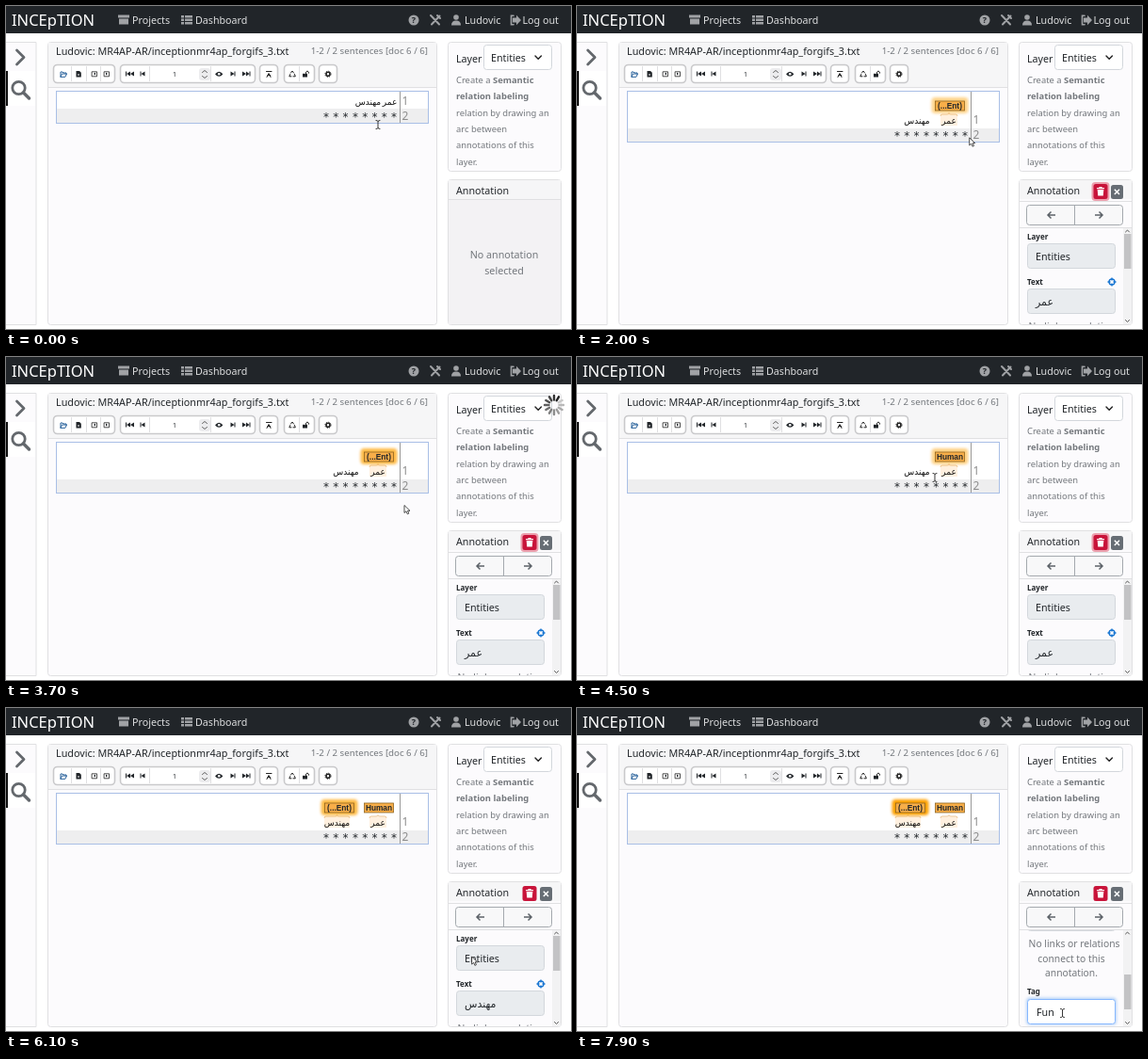
These frames come from a looping animation (600x343 px, 8 s). An HTML page:

```html
<!DOCTYPE html>
<html lang="en">
<head>
<meta charset="utf-8">
<title>Annotation editor</title>
<style>
html, body { margin: 0; width: 100%; height: 100%; overflow: hidden; background: #fff; }
svg { display: block; width: 600px; height: 343px; font: 10.7px "Noto Sans", "Open Sans", sans-serif; }
.panel { fill: #fcfbfd; stroke: #e0e0e2; }
.head { fill: #f6f6f7; }
.line { stroke: #e0e0e2; fill: none; }
.nav { fill: #dedfe0; }
.icon { fill: #a0a2a5; }
.muted { fill: #73777c; }
.small { font-size: 9.4px; }
.label { font-size: 8px; font-weight: 700; }
.group { fill: #fff; stroke: #c9c9cb; stroke-width: 1.6; }
.field { fill: #e9ecef; stroke: #d3d7dc; }
.ar { font-family: "DejaVu Sans", sans-serif; font-size: 9px; text-anchor: middle; }
.stars { font: 12px "DejaVu Sans", sans-serif; letter-spacing: 4.3px; }
.num { font-size: 12px; fill: #8c8c8c; }
.tag { font: 700 8.3px "Liberation Sans", Arial, sans-serif; text-anchor: middle; }
.mid { text-anchor: middle; }
.stroke { fill: none; stroke: #222; stroke-linecap: round; stroke-linejoin: round; }
</style>
</head>
<body>
<svg viewBox="0 0 600 343" fill="#212529">
<defs>
  <filter id="soft" x="-50%" y="-100%" width="200%" height="300%"><feGaussianBlur stdDeviation="1.7"/></filter>
  <clipPath id="view"><rect x="470" y="236" width="110" height="102"/></clipPath>
  <g id="back"><path d="M0 0l4-2.5v5zM-4 0l4-2.5v5z"/></g>
</defs>

<!-- navigation bar -->
<rect width="600" height="29"/>
<text x="6" y="21" font-size="16.5" fill="#fff">INCEpTION</text>
<g class="icon">
  <path d="M119 9.500h12v3h-12zM120 13.500h10v6h-10z"/>
  <path d="M186 10h3v2.500h-3zm4 0h8v2.500h-8zm-4 3.500h3v2.500h-3zm4 0h8v2.500h-8zm-4 3.500h3v2.500h-3zm4 0h8v2.500h-8z"/>
  <circle cx="433" cy="15" r="5.500"/>
  <circle cx="478" cy="12" r="2.800"/><path d="M473 20.500q0-5 5-5t5 5z"/>
  <path d="M538 12.500h4v-2.700l5 5.200-5 5.200v-2.700h-4z"/>
</g>
<text x="433" y="18.300" class="mid" font-size="9" font-weight="700">?</text>
<g fill="none" stroke="#a0a2a5" stroke-width="2" stroke-linecap="round">
  <path d="M452 11l8 8.500M460.500 10.500l-8.500 9M458 10l3 3M451 10l2.500 2.500"/>
  <path d="M539 10.300h-2.500v9.400h2.500" stroke-width="1.600"/>
</g>
<g class="nav">
  <text x="134" y="19">Projects</text><text x="201" y="19">Dashboard</text>
  <text x="487" y="19">Ludovic</text><text x="548.500" y="19">Log out</text>
</g>

<!-- sidebar -->
<path class="panel" d="M-1 38.500h33v300h-33z"/>
<path fill="#fff" d="M0 69h31v37h-31z"/>
<path fill="#111" d="M0 69h2v37h-2z"/>
<g fill="none" stroke="#64686d" stroke-width="2.800" stroke-linecap="round">
  <path d="M11.500 47l7.500 7.500-7.500 7.500" stroke-linejoin="round"/>
  <circle cx="13.500" cy="87" r="6.700"/><path d="M18.500 92l6 6" stroke-width="3.500"/>
</g>

<!-- document panel -->
<rect class="panel" x="44.500" y="38.500" width="413" height="300" rx="3"/>
<path class="head" d="M45 39h412v47h-412z"/><path class="line" d="M45 86.500h412"/>
<text x="53" y="52" font-size="10.800">Ludovic: MR4AP-AR/inceptionmr4ap_forgifs_3.txt</text>
<text x="448" y="51" class="muted" font-size="9.700" text-anchor="end">1-2 / 2 sentences [doc 6 / 6]</text>
<g class="group">
  <rect x="50.500" y="62.500" width="65" height="19" rx="4"/>
  <rect x="121.500" y="62.500" width="143" height="19" rx="4"/>
  <rect x="269.500" y="62.500" width="19" height="19" rx="4"/>
  <rect x="295.500" y="62.500" width="32" height="19" rx="4"/>
  <rect x="332.500" y="62.500" width="19" height="19" rx="4"/>
</g>
<path class="line" d="M69.500 64v16M85.500 64v16M100.500 64v16M152.500 64v16M217.500 64v16M311.500 64v16"/>
<path class="stroke" style="stroke:#27609a" d="M58 75v-5h2l1 1h3v1M58 75l1.500-3h5l-1.500 3z"/>
<path d="M74.500 69h3.500l1.800 1.800v4.700h-5.300z"/><path d="M76 73h2" stroke="#fff"/>
<path class="stroke" stroke-width=".8" d="M91.500 69.800h5v5h-5zM104.500 69.800h5v5h-5z"/>
<path d="M93 72l2-1.500v3zM108 72l-2-1.500v3z"/>
<use href="#back" x="132" y="72"/><path d="M127 69.500h1v5h-1zM142.500 69.500h1v5h-1zM143.500 72l4-2.500v5z"/>
<text x="179" y="74.500" class="mid" font-size="7">1</text>
<rect x="205" y="66" width="12" height="13" rx="3" fill="#ececee"/>
<path class="stroke" style="stroke:#555" stroke-width=".9" d="M208.500 70.500l2.500-2 2.500 2M208.500 74.500l2.500 2 2.500-2"/>
<path d="M222 72.200q4.200-5 8.400 0-4.200 5-8.400 0z"/><circle cx="226.200" cy="72.200" r="1.300" fill="#fff"/>
<path d="M238.500 69.500l4 2.500-4 2.500zM242.500 69.500h1v5h-1zM251 69.500l4 2.500-4 2.500zM255 69.500l3.500 2.500-3.500 2.500zM258.500 69.500h1v5h-1z"/>
<path class="stroke" d="M276.500 69.500h5.500M277 75.500l2-4 2 4M278 73.500h2.500"/>
<path class="stroke" d="M302.500 71l1.500-2 1.500 2M306.500 72.500l.8 2.300h-2.300M303 74.800h-2.200l1-2.300"/>
<path d="M315 71.800h5v3.700h-5z"/><path class="stroke" d="M318.500 71.500v-1.300q1.500-2.500 3 0v1"/>
<circle cx="342" cy="72.300" r="2" fill="none" stroke="#222" stroke-width="1.600"/>
<circle cx="342" cy="72.300" r="3.100" fill="none" stroke="#222" stroke-width="1" stroke-dasharray="1.200 1.230"/>

<!-- text editor -->
<rect id="editor" x="53.500" y="90.500" width="395" height="34" fill="#fff"/>
<rect id="stripe" x="54" y="109" width="394" height="15" fill="#eeeeef"/>
<rect id="frame" x="53.500" y="90.500" width="395" height="34" fill="none" stroke="#a9bfe6"/>
<path id="gutter" d="M418.500 91v33" stroke="#999"/>
<rect id="mark" y="94" height="14" fill="#0b78d0"/>
<g id="spans"></g>
<text id="name" class="ar">عمر</text>
<text id="job" class="ar">مهندس</text>
<g id="rows">
  <text x="420.500" y="105" class="num">1</text>
  <text x="420.500" y="121" class="num">2</text>
  <text x="337" y="121.500" class="stars">********</text>
</g>

<!-- layer panel -->
<rect class="panel" x="469.500" y="38.500" width="120" height="137" rx="3"/>
<text x="478" y="59.500">Layer</text>
<rect x="507.500" y="41.500" width="72" height="26" rx="3" fill="#fff" stroke="#d3d7dc"/>
<text x="515" y="59">Entities</text>
<path class="stroke" stroke-width="1.400" d="M562 53l3.200 3.200 3.200-3.200"/>
<g class="muted small">
  <text x="478" y="82">Create a <tspan font-weight="700">Semantic</tspan></text>
  <text x="478" y="99.300" font-weight="700">relation labeling</text>
  <text x="478" y="116.700">relation by drawing an</text>
  <text x="478" y="134">arc between</text>
  <text x="478" y="151.300">annotations of this</text>
  <text x="478" y="168.700">layer.</text>
</g>

<!-- annotation panel -->
<rect class="panel" x="469.500" y="184.500" width="120" height="154" rx="3"/>
<path class="head" d="M470 185h119v20h-119z"/>
<text x="478" y="200">Annotation</text>
<g id="empty">
  <path fill="#f3f2f4" d="M470 206h119v132h-119z"/><path class="line" d="M470 205.500h119"/>
  <g class="muted mid"><text x="529" y="268">No annotation</text><text x="529" y="285">selected</text></g>
</g>
<g id="detail">
  <path class="line" d="M470 207.500h119"/>
  <rect id="ring" x="546.500" y="187" width="19" height="20" rx="4" fill="#eca0ae"/>
  <rect x="548.500" y="189" width="15" height="16" rx="2.500" fill="#c8143a"/>
  <path fill="#fff" d="M552 193h2.500v-1h3v1h2.500v1.300h-8zM552.700 195h6.600l-.5 6.500h-5.600z"/>
  <rect x="567" y="190" width="13" height="15" rx="2.500" fill="#666d74"/>
  <path d="M570.800 194.800l5.200 5.200m0-5.200l-5.200 5.200" stroke="#fff" stroke-width="1.500"/>
  <rect x="477.500" y="211.500" width="102" height="21" rx="3" fill="#f8f8f9" stroke="#a4a9ae"/>
  <path d="M528.500 212v20" stroke="#a4a9ae"/>
  <path fill="none" stroke="#5d6369" stroke-width="1.500" d="M508 222h-8m3.500-3.500l-3.500 3.500 3.500 3.500M550 222h8m-3.500-3.500l3.500 3.500-3.500 3.500"/>
  <path class="line" d="M470 235.500h119"/>
  <g clip-path="url(#view)"><g id="content">
    <text x="478" y="248" class="label">Layer</text>
    <rect class="field" x="478.500" y="252.500" width="93" height="26" rx="3"/>
    <text x="487" y="270">Entities</text>
    <text x="478" y="296" class="label">Text</text>
    <g fill="none" stroke="#1674d1" stroke-width="1.300"><circle cx="568" cy="293" r="3"/><path d="M568 288.500v3m0 3v3m-4.500-4.500h3m3 0h3"/></g>
    <rect class="field" x="478.500" y="300.500" width="93" height="26" rx="3"/>
    <text id="value" class="ar" y="318" style="font-size:11px;text-anchor:start"></text>
    <g class="muted mid" font-size="10.300">
      <text x="528" y="344">No links or relations</text><text x="525" y="359.500">connect to this</text><text x="525" y="374.500">annotation.</text>
    </g>
    <text x="478" y="394" class="label">Tag</text>
    <rect id="focus" x="477" y="397.500" width="96" height="29" rx="4" fill="#b9d5f8" filter="url(#soft)"/>
    <rect id="input" x="478.500" y="399.500" width="93" height="26" rx="3" fill="#fff"/>
    <text id="typed" x="488" y="417"></text>
  </g></g>
  <path fill="#f2f2f3" d="M580 236h9v102h-9z"/>
  <path class="stroke" style="stroke:#555" d="M582.500 240l2-2 2 2M582.500 333.500l2 2 2-2"/>
  <rect id="thumb" x="581" y="242" width="7.500" height="37" fill="#c3c3c5"/>
</g>

<g id="spinner" stroke-width="2.400" stroke-linecap="round"></g>
<path id="beam" class="stroke" stroke-width=".9" d="M-2-4.500q2 0 2 1v7q0 1-2 1M2-4.500q-2 0-2 1M0 3.500q0 1 2 1"/>
<path id="arrow" d="M-2-4.500v8l2-1.700 1.300 3 1.500-.7-1.300-2.800h2.500z" fill="#fff" stroke="#222" stroke-width=".8"/>
</svg>

<script>
const LOOP = 8000;
const el = id => document.getElementById(id);
const set = (id, attrs) => { for (const k in attrs) el(id).setAttribute(k, attrs[k]); };
const show = (id, on) => { el(id).style.display = on ? "" : "none"; };
const within = (t, a, b) => t >= a && t < b;
const ease = p => p * p * (3 - 2 * p);

// time, x, y of the pointer
const path = [
  [0, 395, 126], [400, 395, 126], [1100, 405, 106], [1500, 405, 106], [2300, 425, 162],
  [3700, 425, 162], [4500, 380, 128], [4800, 360, 122], [5050, 360, 122], [5500, 407, 195],
  [5650, 407, 195], [6250, 513, 282], [6650, 513, 282], [7150, 515.5, 324], [8000, 515.5, 324]
];

function pointer(t) {
  const i = path.findIndex(p => p[0] > t);
  const [a, b] = [path[i - 1], path[i]];
  const p = ease((t - a[0]) / (b[0] - a[0]));
  return [a[1] + (b[1] - a[1]) * p, a[2] + (b[2] - a[2]) * p];
}

function makeSpan(id, x, wordX, wordW) {
  const mid = wordX + wordW / 2;
  return `<g id="${id}">
    <rect x="${wordX}" y="115" width="${wordW}" height="12" fill="#fff0df"/>
    <path d="M${wordX} 117q0-2 2-2H${mid - 2}q2 0 2-1.500q0 1.500 2 1.500H${wordX + wordW - 2}q2 0 2 2" fill="none" stroke="#e6b77d" stroke-width=".7"/>
    <rect id="${id}Glow" x="${x - 2.5}" y="98" width="37" height="15" rx="3" fill="#ffa000" stroke="#ffa000" stroke-width="2" filter="url(#soft)"/>
    <rect x="${x + .5}" y="101" width="31" height="10" fill="#f8ae49" stroke="#8d641f" stroke-width=".8"/>
    <text id="${id}Tag" x="${x + 16}" y="109" class="tag"></text></g>`;
}
el("spans").innerHTML = makeSpan("first", 380, 386, 18) + makeSpan("second", 338, 338, 27);
el("spinner").innerHTML = Array.from({ length: 12 }, (_, i) =>
  `<path d="M0-5.500v-4.500" transform="translate(582 51) rotate(${i * 30})"/>`).join("");

function render(t) {
  const made = t >= 1900, both = t >= 5700;
  const grow = made ? 20 : 0;
  set("editor", { height: 34 + grow });
  set("frame", { height: 34 + grow });
  set("stripe", { y: 109 + grow + (made ? 1 : 0), height: made ? 14 : 15 });
  set("gutter", { d: `M418.500 91v${33 + grow}` });
  set("rows", { transform: `translate(0 ${grow})` });

  const pickName = within(t, 1200, 1600), pickJob = within(t, 4850, 5250);
  show("mark", pickName || pickJob);
  set("mark", pickJob ? { x: 347, y: 114, width: 28 } : { x: 399, y: 94, width: 17 });
  set("name", { x: made ? 395 : 407.5, y: 104.5 + grow, fill: pickName ? "#fff" : "#111" });
  set("job", { x: both ? 351.5 : made ? 361 : 384.5, y: 104.5 + grow, fill: pickJob ? "#fff" : "#111" });

  const pulse = .5 + .5 * Math.cos((t - 5500) / 2400 * 2 * Math.PI);
  show("first", made);
  show("second", both);
  show("firstGlow", !both);
  for (const id of ["first", "second"]) set(id + "Glow", { opacity: .45 + .55 * pulse });
  el("firstTag").textContent = t < 3800 ? "(...Ent)" : "Human";
  el("secondTag").textContent = "(...Ent)";

  show("empty", !made);
  show("detail", made);
  show("ring", t < 5000);
  el("value").textContent = el(both ? "job" : "name").textContent;
  set("value", { x: 487 });
  const scroll = ease(Math.min(1, Math.max(0, (t - 6200) / 350)));
  set("content", { transform: `translate(0 ${-90 * scroll})` });
  set("thumb", { y: 242 + 41 * scroll });
  const focused = t >= 7250;
  show("focus", focused);
  set("input", { stroke: focused ? "#86b7fe" : "#d3d7dc" });
  el("typed").textContent = "Fun".slice(0, Math.max(0, Math.floor((t - 7400) / 150)));

  show("spinner", within(t, 1500, 1900) || within(t, 3300, 3800) || within(t, 5200, 5700));
  const step = Math.floor(t / 100);
  [...el("spinner").children].forEach((bar, i) => {
    const age = (step - i + 120) % 12;
    bar.setAttribute("stroke", `rgb(${Array(3).fill(35 + age * 15)})`);
  });

  const [x, y] = pointer(t);
  const arrow = within(t, 1850, 4200) || within(t, 5200, 6200);
  show("arrow", arrow);
  show("beam", !arrow);
  set(arrow ? "arrow" : "beam", { transform: `translate(${x} ${y})` });
}

function tick() {
  render(performance.now() % LOOP);
  requestAnimationFrame(tick);
}
tick();
</script>
</body>
</html>
```
